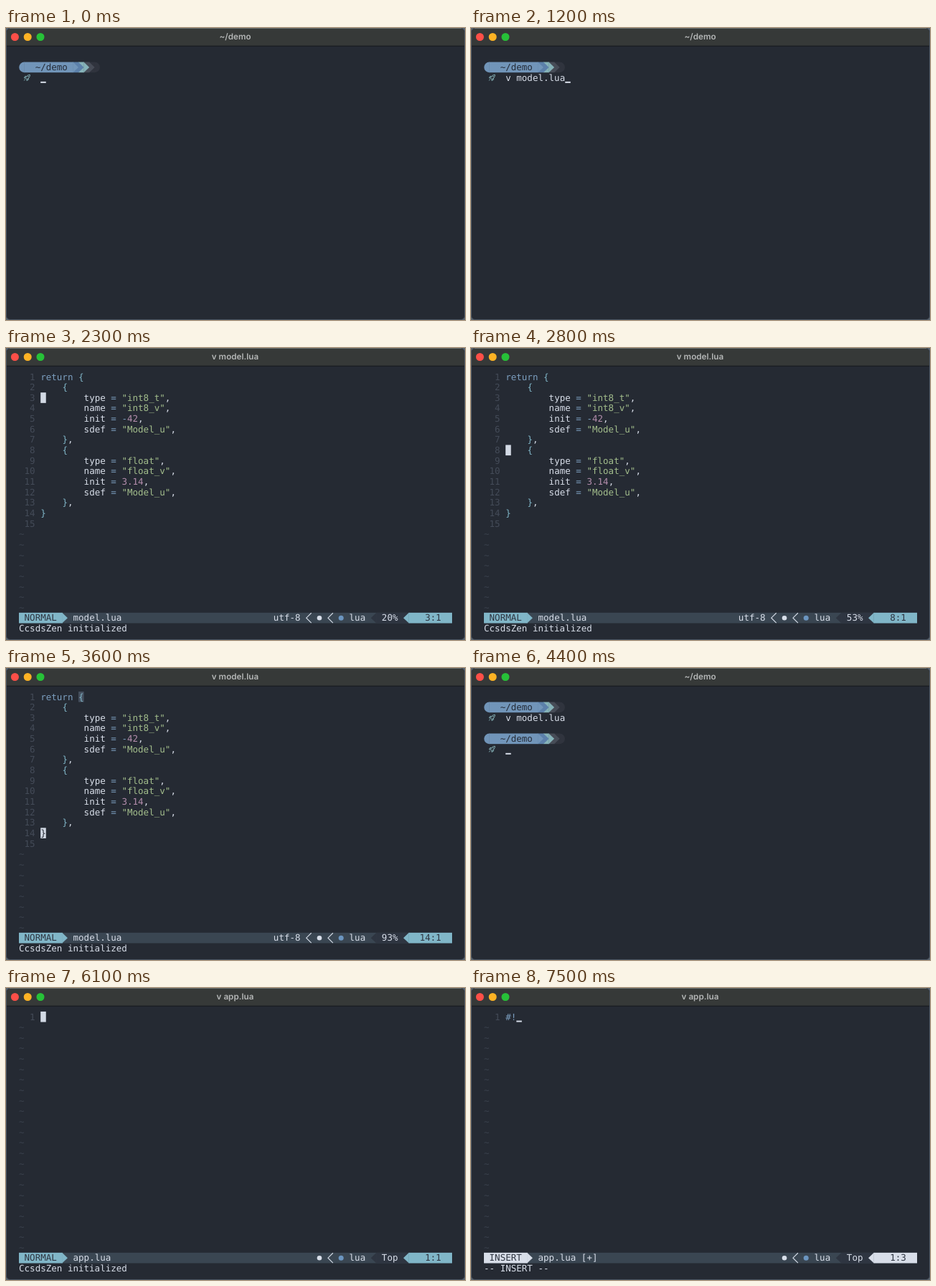
Animation of 640 by 408 pixels, one loop 8 s. Source, as an HTML page:

```html
<!DOCTYPE html>
<html lang="en">
<head>
<meta charset="utf-8">
<title>Terminal demo</title>
<style>
  html, body { margin: 0; width: 100%; height: 100%; overflow: hidden; background: #59636d; }
  svg { display: block; width: 640px; height: 408px; }
  text { white-space: pre; text-rendering: geometricPrecision; }
  #screen text { font: 12.54px "DejaVu Sans Mono", "Liberation Mono", monospace; }
  #title { font: 600 11.7px Inter, "Open Sans", sans-serif; fill: #b5b7b7; text-anchor: middle; }
</style>
</head>
<body>
<svg viewBox="0 0 640 408">
  <rect x=".5" y=".5" width="639" height="407" rx="5" fill="#252a33" stroke="#4b5562"/>
  <path d="M1 25V6a5 5 0 0 1 5-5h628a5 5 0 0 1 5 5v19z" fill="#363938"/>
  <path d="M5 .5h630" stroke="#6b7070"/>
  <path d="M1 25.2h638" stroke="#15181b"/>
  <circle cx="12.4" cy="12.5" r="5.5" fill="#fe4f48"/>
  <circle cx="30.2" cy="12.5" r="5.5" fill="#fdb324"/>
  <circle cx="48" cy="12.5" r="5.5" fill="#27c138"/>
  <text id="title" x="319.5" y="16.4"></text>
  <g id="screen"></g>
</svg>
<script>
const LOOP = 8000;
const CW = 7.55, RH = 14.65, LEFT = 18, TOP = 32.9;
const C = {
  bg: '#252a33', text: '#d8dee9', blue: '#7c9fc0', teal: '#80b6c8', green: '#a3be8c',
  purple: '#b48ead', number: '#444b58', tilde: '#3a414d', match: '#46505f',
  bar: '#3a4652', dark: '#2e3541', cursor: '#d3dae5',
  pill: '#7195b9', pill2: '#5c80aa', pill3: '#86b3b9', pill4: '#474c57', pill5: '#30343e'
};

const item = (type, name, init) =>
  `    {\n        type = "${type}",\n        name = "${name}",\n        init = ${init},\n        sdef = "Model_u",\n    },\n`;
const MODEL = ('return {\n' + item('int8_t', 'int8_v', '-42') + item('float', 'float_v', '3.14') + '}\n').split('\n');

// Each cue patches the state from its time on.
const cues = [[0, { view: 'shell', title: '~/demo', past: '', typed: '', entered: false }]];
const cue = (t, patch) => cues.push([t, patch]);
const type = (cmd, t, counts) =>
  counts.forEach((n, i) => n && cue(t + i * 100, { typed: cmd.slice(0, n) }));
const open = (t, file, lines) => {
  cue(t, { entered: true, title: 'v ' + file });
  cue(t + 100, { view: 'editor', file, lines, line: 1, col: 1, mode: 'NORMAL', msg: '', changed: false });
  cue(t + 200, { msg: 'CcsdsZen initialized' });
};

type('v model.lua', 600, [1, 2, 4, 6, 8, 9, 11]);
open(1300, 'model.lua', MODEL);
for (let n = 2; n <= 11; n++) cue(2000 + n * 100, { line: n });
cue(3300, { line: 12 });
cue(3400, { line: 13 });
cue(3500, { line: 14 });
cue(3800, { mode: 'COMMAND', msg: ':' });
cue(4000, { msg: ':q' });
cue(4400, { view: 'shell', title: '~/demo', past: 'v model.lua', typed: '', entered: false });
type('v app.lua', 4700, [1, 3, 0, 5, 0, 6, 0, 0, 7, 8, 9]);
open(5900, 'app.lua', ['']);
cue(6900, { mode: 'INSERT', msg: '-- INSERT --' });
cue(7100, { lines: ['#'], col: 2, changed: true });
cue(7400, { lines: ['#!'], col: 3 });

const X = col => LEFT + col * CW;
const Y = row => TOP + row * RH;
const esc = s => s.replace(/&/g, '&amp;').replace(/</g, '&lt;');
const text = (col, row, s, fill = C.text) =>
  `<text x="${X(col)}" y="${Y(row) + 11.6}" fill="${fill}">${esc(s)}</text>`;
const box = (col, row, cols, fill) =>
  `<rect x="${X(col)}" y="${Y(row)}" width="${cols * CW}" height="${RH}" fill="${fill}"/>`;
const poly = (points, fill) => `<polygon points="${points}" fill="${fill}"/>`;
const arrowR = (col, row, fill) =>
  poly([X(col) - .2, Y(row), X(col + 1), Y(row + .5), X(col) - .2, Y(row + 1)], fill);
const arrowL = (col, row, fill) =>
  poly([X(col + 1) + .2, Y(row), X(col), Y(row + .5), X(col + 1) + .2, Y(row + 1)], fill);
const thin = (col, row) =>
  `<path d="M${X(col + 1)} ${Y(row) + .4}L${X(col) + .6} ${Y(row + .5)}L${X(col + 1)} ${Y(row + 1) - .4}" fill="none" stroke="${C.text}" stroke-width="1.1"/>`;
const dot = (col, row, r, fill) =>
  `<circle cx="${X(col + .5)}" cy="${Y(row + .5)}" r="${r}" fill="${fill}"/>`;
const block = (col, row, ch = '') => box(col, row, 1, C.cursor) + text(col, row, ch, C.bg);
const underline = (col, row) =>
  `<rect x="${X(col)}" y="${Y(row + 1) - 2}" width="${CW}" height="2" fill="${C.text}"/>`;

const rocket = row =>
  `<g transform="translate(${X(1.5)} ${Y(row + .5)})" fill="none" stroke="${C.pill3}" stroke-width="1">
  <path d="M4-4.2C1.4-4.3-.6-2.6-2 .3L-.2 2.1C2.6 .7 4.2-1.4 4-4.2zM-.6-2.1L-2.7-2-4 .3h2M2 .6L1.9 2.7-.4 4V2.1M-2.7 2L-4 3.9"/>
  <circle cx="1.6" cy="-1.8" r=".5"/></g>`;

function prompt(row, cmd) {
  const r = RH / 2;
  const cap = (x, dir, fill) =>
    `<path d="M${x} ${Y(row)}a${r} ${r} 0 0 ${dir} 0 ${RH}z" fill="${fill}"/>`;
  return cap(X(1), 0, C.pill) + box(.95, row, 9.1, C.pill) +
    box(10, row, 1.05, C.pill2) + box(11, row, 1.05, C.pill3) +
    box(12, row, 1.05, C.pill4) + box(13, row, 1.05, C.pill5) + cap(X(14), 1, C.pill5) +
    [C.pill, C.pill2, C.pill3, C.pill4].map((c, i) => arrowR(10 + i, row, c)).join('') +
    text(3, row, '~/demo', '#252c38') + rocket(row + 1) + text(4, row + 1, cmd);
}

function shell(s) {
  const row = s.past ? 4 : 1;
  return (s.past ? prompt(1, s.past) : '') + prompt(row, s.typed) +
    (s.entered ? underline(0, row + 2) : underline(4 + s.typed.length, row + 1));
}

const rules = [
  [/^"[^"]*"/, C.green], [/^(return|[=#!-]+)/, C.blue], [/^[{}]/, C.teal],
  [/^[\d.]+/, C.purple], [/^[\w,]+/, C.text]
];
function code(line, row) {
  let out = '', i = 0;
  while (i < line.length) {
    const rest = line.slice(i);
    const rule = rules.find(([re]) => re.test(rest));
    const token = rule ? rest.match(rule[0])[0] : rest[0];
    if (rule) out += text(4 + i, row, token, rule[1]);
    i += token.length;
  }
  return out;
}

function status(s) {
  const row = 23, n = s.mode.length;
  const main = s.mode === 'INSERT' ? C.text : C.teal;
  const pos = s.line === 1 ? 'Top' : Math.floor(s.line / s.lines.length * 100) + '%';
  return box(0, row, 80, C.bar) + box(0, row, n + 2.05, main) + arrowR(n + 2, row, main) +
    text(1, row, s.mode, C.dark) + text(n + 4, row, s.file + (s.changed ? ' [+]' : '')) +
    (s.file === 'model.lua' ? text(47, row, 'utf-8') + thin(53, row) : '') +
    dot(55, row, 3.3, C.text) + thin(57, row) + dot(59, row, 3.5, '#6b95c0') + text(61, row, 'lua') +
    arrowL(65, row, C.dark) + box(66, row, 6, C.dark) + text(67, row, pos) +
    arrowL(71, row, main) + box(72, row, 8, main) +
    text(72, row, String(s.line).padStart(4) + ':' + s.col, C.dark);
}

function editor(s) {
  let out = '';
  const last = s.lines.length;
  if (s.lines[s.line - 1] === '}') out += box(11, 0, 1, C.match);
  for (let r = 0; r < 23; r++) {
    out += r < last
      ? text(0, r, String(r + 1).padStart(3), C.number) + code(s.lines[r], r)
      : text(0, r, '~', C.tilde);
  }
  out += status(s) + text(0, 24, s.msg);
  const col = 3 + s.col, row = s.line - 1;
  if (s.mode === 'NORMAL') return out + block(col, row, s.lines[row][s.col - 1]);
  if (s.mode === 'INSERT') return out + underline(col, row);
  return out + block(s.msg.length, 24);
}

const screen = document.getElementById('screen');
const title = document.getElementById('title');
const start = performance.now();
let shown = -1;

function draw() {
  const t = (performance.now() - start) % LOOP;
  const count = cues.filter(([at]) => at <= t).length;
  if (count !== shown) {
    shown = count;
    const s = Object.assign({}, ...cues.slice(0, count).map(c => c[1]));
    title.textContent = s.title;
    screen.innerHTML = s.view === 'shell' ? shell(s) : editor(s);
  }
  requestAnimationFrame(draw);
}
draw();
</script>
</body>
</html>
```
